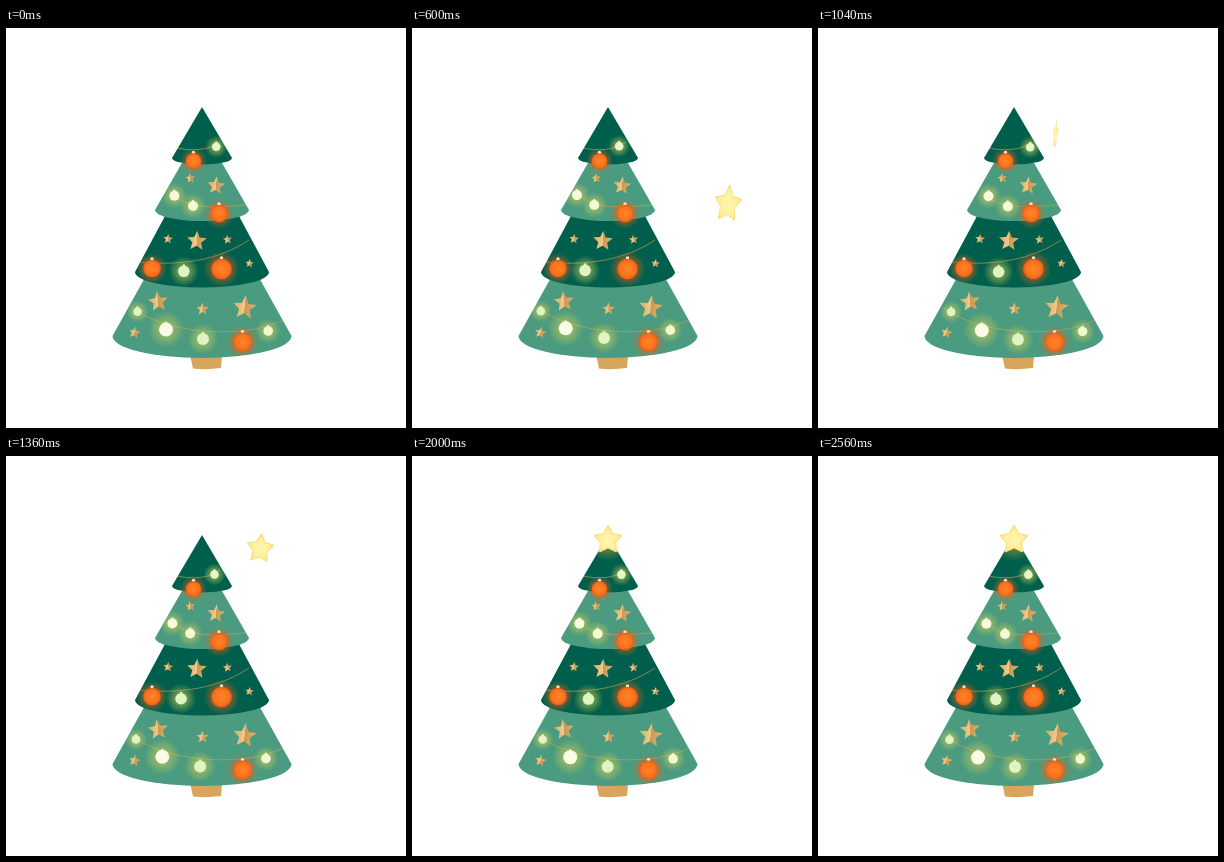
Animation of 400 by 400 pixels, one loop 2800 ms. Source, as an HTML page with a canvas:

```html
<!DOCTYPE html>
<html lang="en">
<head>
<meta charset="utf-8">
<title>Christmas tree</title>
<style>
  html, body { margin: 0; width: 100%; height: 100%; overflow: hidden; background: #fff; }
  canvas { display: block; width: 400px; height: 400px; }
</style>
</head>
<body>
<canvas id="stage" width="400" height="400"></canvas>
<script>
const ctx = document.getElementById('stage').getContext('2d');
const LOOP = 2800, STEP = 40, LAST = 2560, CX = 196;
const DARK = '#005f4c', LIGHT = '#4a9b80';

// apex y, base y, half width, depth of the curved hem, colour
const tiers = [
  [147, 308, 89.5, 22, LIGHT],
  [119, 244, 67, 15.5, DARK],
  [100, 182, 47, 11, LIGHT],
  [79, 130, 30, 6.5, DARK]
];
// start, control 1, control 2, end
const wires = [
  [171, 120, 184, 123, 203, 123, 214, 114],
  [163, 163, 181, 183, 210, 179, 240, 177],
  [134, 234, 172, 238, 212, 233, 243, 212],
  [125, 279, 158, 306, 238, 312, 277, 292]
];
// x, y, radius
const balls = [
  [187.5, 133, 7.8], [213, 185.5, 8.8], [146, 240.5, 8.8],
  [215.5, 241, 10.3], [236.5, 314, 9.6]
];
// x, y, radius, share of the swing, colour
const bulbs = [
  [210.3, 118.8, 4.3, .5, '#e6f6c8'], [168.4, 167.8, 5, .55, '#f6fbdc'],
  [187, 178, 5, .75, '#f3fad6'], [177.8, 243.3, 5.8, .75, '#e0f3c2'],
  [131.5, 283.7, 4.3, .42, '#e0f3c2'], [160, 301.6, 7, 1, '#fbfce6'],
  [197, 311, 6, .78, '#e0f3c2'], [262.2, 303, 4.8, .62, '#f0f8d0']
];
// x, y, radius, tilt
const ornaments = [
  [184.3, 150.3, 5, -.1], [210, 157.8, 9.3, .1], [162, 211, 5, .1],
  [190.8, 213, 10.3, .05], [221.5, 211.5, 4.8, -.1], [243.5, 235.5, 4.5, .1],
  [152, 273.7, 10.5, -.1], [196.5, 281, 6.4, 0], [238.6, 279.8, 12.3, .1],
  [128.5, 304.7, 6, .2]
];

const clamp01 = v => Math.max(0, Math.min(1, v));
const smooth = v => { v = clamp01(v); return v * v * (3 - 2 * v); };
const rad = deg => deg * Math.PI / 180;

function disc(x, y, r, fill) {
  ctx.fillStyle = fill;
  ctx.beginPath();
  ctx.arc(x, y, r, 0, 7);
  ctx.fill();
}

function glow(x, y, r, rgb, alpha) {
  const g = ctx.createRadialGradient(x, y, 0, x, y, r);
  g.addColorStop(0, `rgba(${rgb},${alpha})`);
  g.addColorStop(.45, `rgba(${rgb},${alpha * .65})`);
  g.addColorStop(1, `rgba(${rgb},0)`);
  disc(x, y, r, g);
}

function starPath(r, inner) {
  ctx.beginPath();
  for (let i = 0; i < 10; i++) {
    const a = i * Math.PI / 5, d = i % 2 ? r * inner : r;
    ctx.lineTo(d * Math.sin(a), -d * Math.cos(a));
  }
  ctx.closePath();
}

function drawTier([apex, base, half, hem, color]) {
  ctx.fillStyle = color;
  ctx.beginPath();
  ctx.moveTo(CX, apex);
  ctx.ellipse(CX, base, half, hem, 0, 0, Math.PI);
  ctx.closePath();
  ctx.fill();
}

function drawTrunk() {
  ctx.fillStyle = '#d8a55c';
  ctx.beginPath();
  ctx.moveTo(183, 322);
  ctx.lineTo(216.5, 322);
  ctx.lineTo(215, 340);
  ctx.quadraticCurveTo(200, 342, 187, 340.5);
  ctx.closePath();
  ctx.fill();
}

function drawWire([x, y, ...curve]) {
  ctx.strokeStyle = 'rgba(196,164,78,.7)';
  ctx.lineWidth = .9;
  ctx.beginPath();
  ctx.moveTo(x, y);
  ctx.bezierCurveTo(...curve);
  ctx.stroke();
}

function drawOrnament([x, y, r, tilt]) {
  ctx.save();
  ctx.translate(x, y);
  ctx.rotate(tilt);
  starPath(r, .45);
  const g = ctx.createLinearGradient(-r, 0, r, 0);
  g.addColorStop(0, '#dca860');
  g.addColorStop(.49, '#f0ca8c');
  g.addColorStop(.51, '#cb9850');
  g.addColorStop(1, '#e4b671');
  ctx.fillStyle = g;
  ctx.fill();
  ctx.restore();
}

function drawBall([x, y, r]) {
  disc(x, y - r - .8, 1.7, '#f6e6cf');
  const g = ctx.createRadialGradient(x, y, 0, x, y, r);
  g.addColorStop(0, '#ff842b');
  g.addColorStop(.7, '#fa741d');
  g.addColorStop(1, '#ee5c15');
  disc(x, y, r, g);
}

function swing(t) {
  const fade = clamp01((2600 - t) / 2000);
  return t < 60 ? 0 : 6.3 * fade * Math.sin(Math.PI * (t - 60) / 360);
}

// The star spirals up around the tree, slowing down towards the top.
function starPose(t) {
  const u = clamp01(1 - t / 1900), s = t - 600;
  const e = t < 600 ? .319 - .00074 * s - 2.86e-7 * s * s : u ** 3;
  const angle = rad(423 - 1321 * e);
  const settle = smooth((u - .05) / .25);
  const radius = Math.min(120, 66 + 170 * e) * settle;
  return {
    x: CX + radius * Math.cos(angle),
    y: 84 + 287 * e + 110 * Math.max(0, e - .319) + .055 * radius * Math.sin(angle),
    behind: Math.sin(angle) < 0,
    size: 15 * (1 + .9 * e),
    turn: Math.cos(rad(1321 * e * .75)),
    tilt: .1 * settle
  };
}

function drawStar({ x, y, size, turn, tilt }) {
  ctx.save();
  ctx.translate(x, y);
  ctx.rotate(tilt);
  ctx.scale(Math.sign(turn) * Math.max(.16, Math.abs(turn)), 1);
  starPath(size - 1, .53);
  const g = ctx.createRadialGradient(0, 0, 0, 0, 0, size);
  g.addColorStop(0, '#fff6b4');
  g.addColorStop(.6, '#fff09a');
  g.addColorStop(1, '#fbe183');
  ctx.fillStyle = g;
  ctx.strokeStyle = '#f8de80';
  ctx.lineWidth = 2;
  ctx.lineJoin = 'round';
  // The fill comes first in either layering mode.
  if (ctx.globalCompositeOperation === 'destination-over') {
    ctx.fill();
    ctx.stroke();
  } else {
    ctx.stroke();
    ctx.fill();
  }
  ctx.restore();
}

function draw(t) {
  ctx.globalCompositeOperation = 'source-over';
  ctx.clearRect(0, 0, 400, 400);
  const star = starPose(t), shift = swing(t);
  const lights = bulbs.map(([x, y, r, share, color]) =>
    [x + shift * share, y + .2 * shift * share, r, color]);

  drawTrunk();
  tiers.forEach(drawTier);

  // Light falls only on the tree.
  ctx.globalCompositeOperation = 'source-atop';
  wires.forEach(drawWire);
  balls.forEach(([x, y, r]) => glow(x, y, r * 1.75, '240,95,25', .85));
  lights.forEach(([x, y, r]) => glow(x, y, r * 2.6, '206,205,85', .7));
  if (!star.behind) glow(star.x, star.y, star.size * 1.4, '240,180,60', .6);

  ctx.globalCompositeOperation = 'source-over';
  ornaments.forEach(drawOrnament);
  balls.forEach(drawBall);
  lights.forEach(([x, y, r, color]) => {
    disc(x, y - r, 1.2, '#eef0bd');
    disc(x, y, r, color);
  });

  if (star.behind) ctx.globalCompositeOperation = 'destination-over';
  if (t > 0) drawStar(star);

  ctx.globalCompositeOperation = 'destination-over';
  ctx.fillStyle = '#fff';
  ctx.fillRect(0, 0, 400, 400);
}

const start = performance.now();
function tick() {
  const t = (performance.now() - start) % LOOP;
  draw(Math.min(LAST, Math.floor(t / STEP) * STEP));
  requestAnimationFrame(tick);
}
tick();
</script>
</body>
</html>
```
